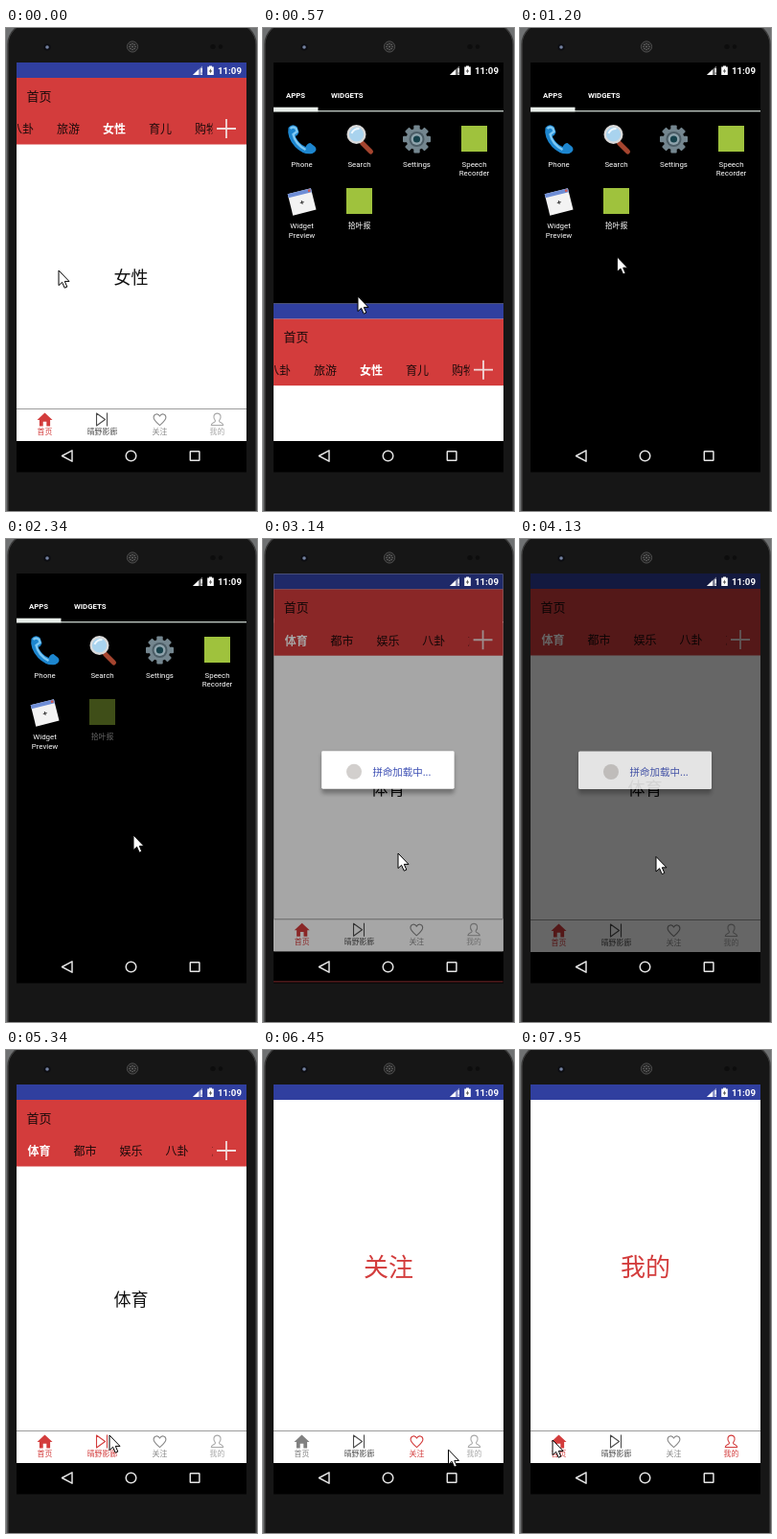
Recreate the animation shown at these times as an HTML page. Size 262 px wide and 504 px high, loop 8 s.

```html
<!DOCTYPE html>
<html lang="zh-CN">
<head>
<meta charset="utf-8">
<title>Phone demo</title>
<style>
html, body { margin: 0; width: 100%; height: 100%; overflow: hidden; background: #6f7172; }
svg { display: block; width: 100%; height: 100%; }
text { font-family: Roboto, "Noto Sans CJK SC", "Noto Sans CJK", sans-serif; }
.cjk text, text.cjk { font-family: "Noto Sans CJK SC", "Noto Sans CJK", sans-serif; }
.mid { text-anchor: middle; }
.line { fill: none; stroke: currentColor; stroke-width: 1.1; stroke-linejoin: round; }
</style>
</head>
<body>
<svg id="stage" viewBox="0 0 262 504" xmlns="http://www.w3.org/2000/svg"></svg>
<script>
const LOOP = 8000;
const RED = '#d33c3c';
const channels = ['体育', '都市', '娱乐', '八卦', '旅游', '女性', '育儿', '购物'];
const tabs = ['首页', '晴野影廊', '关注', '我的'];
const tabGrays = ['#808080', '#4c4c4c', '#888', '#a8a8a8'];
const columns = [40.5, 100.5, 160.5, 220.5];

const ticks = [0, 150, 270, 420, 570, 690, 840, 960, 1080,
  1200, 1350, 1470, 1620, 1770, 1890, 2040, 2190, 2340,
  2870, 2990, 3140, 3260, 3410, 3560, 3680, 3830,
  3980, 4130, 4250, 4380, 4520, 4640, 4780, 4910,
  5220, 5340, 5490, 5640, 5760, 5910, 6060,
  6330, 6450, 6570, 6850, 6990, 7120, 7270, 7420, 7950];

// Pointer path: time, x, y
const pointerPath = [
  [0, 55, 253], [150, 58, 255], [570, 99, 280], [1080, 102, 264], [1470, 100, 182],
  [1620, 100, 182], [1890, 142, 245], [2190, 130, 306], [2340, 133, 309],
  [2870, 134, 311], [3140, 141, 328], [3830, 142, 330], [4250, 142, 332],
  [4910, 108, 402], [5490, 108, 402], [6060, 162, 419], [6330, 162, 419],
  [6570, 225, 415], [6850, 225, 414], [7420, 34, 407]];

const clamp = (v) => Math.max(0, Math.min(1, v));
const ramp = (t, from, to) => clamp((t - from) / (to - from));
const label = (x, y, size, str, extra = '') =>
  `<text x="${x}" y="${y}" font-size="${size}" ${extra}>${str}</text>`;
const box = (x, y, w, h, fill, extra = '') =>
  `<rect x="${x}" y="${y}" width="${w}" height="${h}" fill="${fill}" ${extra}/>`;

function bezel() {
  let mesh = '';
  for (let i = 0; i < 8; i++) {
    const a = i * Math.PI / 4;
    mesh += `<circle cx="${132 + 3 * Math.cos(a)}" cy="${19.5 + 3 * Math.sin(a)}" r=".8"/>`;
  }
  return box(0, 0, 262, 504, '#6f7172') +
    box(2, -5, 259, 560, '#161616', 'rx="22" stroke="#3c3c3c" stroke-width="1.4"') +
    `<circle cx="43" cy="20" r="3.6" fill="#0c0d12"/><circle cx="43" cy="20" r="1.8" fill="#7482a0"/>
    <circle cx="132" cy="19.5" r="5.6" fill="#222" stroke="#555" stroke-width=".9"/>
    <g fill="#696969">${mesh}<circle cx="132" cy="19.5" r=".9"/></g>
    <circle cx="216" cy="19.5" r="2.6" fill="#0d0d0d"/><circle cx="224" cy="19.5" r="2.2" fill="#0d0d0d"/>`;
}

function gear() {
  let teeth = '';
  for (let i = 0; i < 8; i++) teeth += box(-3.2, -14.5, 6.4, 7, '#74868f', `rx="1" transform="rotate(${i * 45})"`);
  return `${teeth}<circle r="11" fill="#74868f"/><circle r="8" fill="#4c5d66"/>
    <circle r="6" fill="#8fa4ad"/><circle r="3.6" fill="#17414b"/>`;
}

function launcher() {
  const at = (col, y, body, id = '') => `<g ${id} transform="translate(${columns[col]} ${y})">${body}</g>`;
  const name = (y, ...rows) => rows.map((r, i) => label(0, y + i * 9.2, 7.9, r, 'class="mid"')).join('');
  const phone = `<path d="M-14-12Q-10-17-5-13L-3-7Q-4-4-7-3Q-3 5 4 8Q6 4 9 4L14 8Q17 12 11 15Q2 17-7 8Q-16-2-14-12Z" fill="#1d86cf"/>
    <path d="M-12-11Q-9-14-6-11L-5-8L-9-5Q-7 5 4 11" fill="none" stroke="#7cc8f4" stroke-width="2.4"/>`;
  const lens = `<path d="M3 4L12 13" stroke="#a5452f" stroke-width="5" stroke-linecap="round"/>
    <circle cx="-3" cy="-5" r="8.8" fill="#a9d3ee" stroke="#dadada" stroke-width="2.4"/>
    <path d="M-8-6Q-6-11 0-11" fill="none" stroke="#eef8ff" stroke-width="2"/>`;
  const panel = `<g transform="rotate(-14)">${box(-12.5, -11, 25, 23, '#f3f3f3')}${box(-12.5, -11, 25, 4, '#6f8ed6')}
    ${box(9, -10.4, 2.5, 2.5, '#d45b4f')}<path d="M-2 1H2M0-1V3" stroke="#333"/></g>`;
  const badge = box(-13.5, -14, 27, 27, '#9fc23d');
  return box(11, 36, 240, 395, '#000') + `<g fill="#fff">
    ${label(24, 72.8, 7.8, 'APPS', 'font-weight="700"')}
    ${label(71, 72.8, 7.8, 'WIDGETS', 'font-weight="700"')}
    ${box(11, 86, 240, 1.4, '#b9c2bd')}${box(11, 82.7, 46.5, 4.6, '#e8eeea')}
    ${at(0, 116, phone + name(29, 'Phone'))}
    ${at(1, 116, lens + name(29, 'Search'))}
    ${at(2, 116, gear() + name(29, 'Settings'))}
    ${at(3, 116, badge + name(29, 'Speech', 'Recorder'))}
    ${at(0, 181, panel + name(28.3, 'Widget', 'Preview'))}
    ${at(1, 181, badge + name(28.3, '拾叶报'), 'id="shortcut"')}</g>`;
}

function tabBar() {
  const icons = [
    '<path d="M-8 .5L0-7L8 .5H5.6V7H1.8V2.2H-1.8V7H-5.6V.5Z" fill="currentColor"/>',
    '<path class="line" d="M-6-6.5V6.5L3 0ZM5-7V7"/>',
    '<path class="line" d="M0 6C-3 3.5-6.4 1-6.4-2.2C-6.4-6-1.6-7 0-3.4C1.6-7 6.4-6 6.4-2.2C6.4 1 3 3.5 0 6Z"/>',
    '<path class="line" d="M-6.2 6C-6.2 3-2 3.6-2 1.4C-5-2-3.6-6.4 0-6.4S5-2 2 1.4C2 3.6 6.2 3 6.2 6Z"/>'];
  return box(11, 397, 240, 34, '#fff') + box(11, 397, 240, 1, '#9c9c9c') +
    tabs.map((name, i) => `<g class="tab" transform="translate(${columns[i]} 408.5)">${icons[i]}
      ${label(0, 15.6, 7.9, name, 'class="mid" fill="currentColor"')}</g>`).join('');
}

function app() {
  return `<g id="app" class="cjk">
    ${box(11, 36, 240, 395, '#fff')}${box(11, 36, 240, 16, '#303f9f')}
    <g id="home">${box(11, 52, 240, 69.5, RED)}
      ${label(21.5, 75.6, 13, '首页', 'fill="#1c0b0b"')}
      <g clip-path="url(#strip)"><g id="channels">
        ${channels.map((c, i) => label(34.5 + 48 * i, 110.4, 12, c, 'class="mid channel"')).join('')}
      </g></g>
      <path d="M220 105H240M230 95V115" stroke="#f1dada" stroke-width="1.8"/>
      <text id="heading" class="mid" x="130.5" y="267" font-size="18" fill="#111"></text></g>
    <text id="page" class="mid" x="131" y="235.5" font-size="26" fill="${RED}"></text>
    ${tabBar()}
    ${box(11, 36, 240, 395, '#000', 'id="dim"')}
    <g id="dialog">${box(61, 224, 139, 42, '#000', 'rx="3" opacity=".3" filter="url(#soft)"')}
      ${box(61, 221.5, 139, 39.5, '#fff', 'rx="1.5"')}
      <circle cx="95" cy="243" r="8" fill="#d2cfcd"/>
      ${label(114.5, 247, 10.5, '拼命加载中...', 'fill="#3f51b5"')}</g>
  </g>`;
}

function systemBars() {
  return `<g fill="#fff"><path d="M195 49L205 39.5V49Z" opacity=".45"/><path d="M195 49L201 43.3V49Z"/>
    ${box(203.6, 42, 1.3, 4.6, '#fff')}${box(203.6, 47.6, 1.3, 1.4, '#fff')}
    <path d="M212 39.4H215V40.5H216.8V49H210.2V40.5H212Z"/>
    <path d="M214.2 42L211.8 45.4H213.4L212.8 47.8L215.2 44.6H213.7Z" fill="#444"/>
    ${label(221, 47.7, 9.7, '11:09', 'font-weight="700"')}</g>
    ${box(11, 431, 240, 32.5, '#000')}
    <g fill="none" stroke="#e4e4e4" stroke-width="1.5" stroke-linejoin="round">
    <path d="M58.5 446.5L69 440.8V452.2Z"/><circle cx="130.5" cy="446.5" r="5.3"/>
    <rect x="192.3" y="441.7" width="9.6" height="9.6" rx=".6"/></g>
    ${box(11, 461.4, 239.5, 1, '#7c2a2c', 'id="edge"')}`;
}

const $ = (id) => document.getElementById(id);
const show = (el, on) => el.setAttribute('visibility', on ? 'inherit' : 'hidden');

$('stage').innerHTML = `<defs>
  <clipPath id="screen">${box(11, 36, 240, 395, '#000')}</clipPath>
  <clipPath id="strip">${box(11, 90, 204.5, 30, '#000')}</clipPath>
  <filter id="soft" x="-10%" y="-30%" width="120%" height="160%"><feGaussianBlur stdDeviation="2"/></filter>
  </defs>${bezel()}<g clip-path="url(#screen)">${launcher()}${app()}</g>${systemBars()}
  <path id="pointer" d="M0 0V15.6L3.6 12.3L6.2 18.2L8.8 17.1L6.3 11.4H11Z" fill="#fff" stroke="#000" stroke-width="1"/>`;

const tabEls = [...document.querySelectorAll('.tab')];
const channelEls = [...document.querySelectorAll('.channel')];

function pointerAt(t) {
  const i = pointerPath.findIndex((p) => p[0] > t);
  if (i < 0) return pointerPath[pointerPath.length - 1].slice(1);
  const [a, b] = [pointerPath[i - 1], pointerPath[i]];
  const u = ramp(t, a[0], b[0]);
  return [a[1] + (b[1] - a[1]) * u, a[2] + (b[2] - a[2]) * u];
}

function draw(t) {
  const reopened = t >= 2800;
  const drop = reopened ? 0 : 396 * Math.pow(ramp(t, 250, 700), 1.33);
  const grow = ramp(t, 2800, 3200);
  const scale = reopened ? 1 - Math.pow(1 - grow, 3) : 1;
  $('app').setAttribute('transform',
    `translate(0 ${drop}) translate(100 181) scale(${scale}) translate(-100 -181)`);
  $('app').setAttribute('opacity', reopened ? clamp(grow * 3) : 1);
  show($('app'), drop < 396);
  show($('edge'), reopened && grow > .5 && grow < 1);
  $('shortcut').setAttribute('opacity', t >= 1620 && t < 3300 ? .4 : 1);

  const channel = reopened ? 0 : 5;
  $('channels').setAttribute('transform', `translate(${reopened ? 0 : -161.5} 0)`);
  channelEls.forEach((el, i) => {
    el.setAttribute('fill', i === channel ? '#fff' : '#1c0b0b');
    el.setAttribute('font-weight', i === channel ? 700 : 400);
  });
  $('heading').textContent = channels[channel];

  const leaving = ramp(t, 4130, 4400);
  $('dim').setAttribute('opacity', .6 * ramp(t, 2990, 3247) * (1 - leaving));
  $('dialog').setAttribute('opacity', ramp(t, 2960, 3100) * (1 - ramp(t, 4100, 4270)));

  const page = [5490, 6450, 6850].filter((s) => t >= s).length;
  const pressed = t >= 7950 ? 0 : [5220, 6330, 6570].filter((s) => t >= s).length;
  show($('home'), page === 0);
  $('page').textContent = page ? tabs[page] : '';
  tabEls.forEach((el, i) =>
    el.setAttribute('color', i === page || i === pressed ? RED : tabGrays[i]));

  $('pointer').setAttribute('transform', `translate(${pointerAt(t).join(' ')})`);
}

function tick(now) {
  const t = now % LOOP;
  draw(ticks.filter((s) => s <= t + .5).pop());
  requestAnimationFrame(tick);
}
draw(0);
requestAnimationFrame(tick);
</script>
</body>
</html>
```
